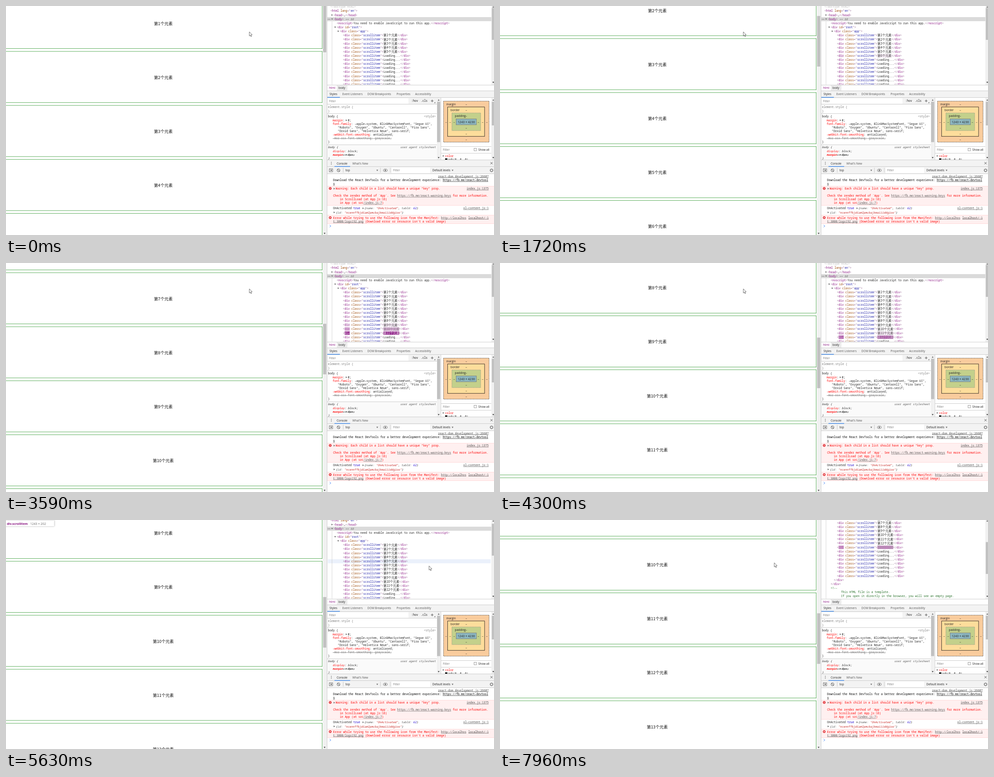
Write an HTML page with a canvas that moves like this. It is 1089 px wide and 514 px high and loops after 8 s.

```html
<!DOCTYPE html>
<html lang="zh">
<head>
<meta charset="utf-8">
<title>Lazy list</title>
<style>
html, body { margin: 0; width: 100%; height: 100%; overflow: hidden; background: #fff; }
canvas { display: block; }
</style>
</head>
<body>
<canvas id="stage" width="1089" height="514"></canvas>
<script>
const ctx = document.getElementById('stage').getContext('2d');
const LOOP = 8000, NOTCH = 57.15, PITCH = 121.15, ROW = 9.14, CH = 3.762;
const MONO = ['"Noto Sans Mono", monospace', 6.27];
const UI = ['"Open Sans", sans-serif', 6.4];
const CJK = ['"Noto Sans CJK SC", "Noto Sans CJK", sans-serif', 6.9];
const TAG = '#881280', BRACKET = '#8f5f8c', ATTR = '#994500', VALUE = '#1a1aa6';
const RED = '#f00', GREY = '#777', DARK = '#222', BAR = '#f3f3f3', EDGE = '#ccc';

// Motion
const NOTCHES = [130, 680, 1610, 1830, 2040, 2240, 2440, 2690, 2870, 3050, 3220, 3390,
  3750, 3950, 4200, 7520, 7640, 7770];
const LOADS = { 6: 850, 7: 1950, 8: 2340, 9: 2790, 10: 3180, 11: 3550, 12: 4140, 13: 7700 };
const MOUSE = [[0, 543, 58], [4500, 543, 58], [4900, 719, 31], [4940, 725, 46], [5310, 940, 103],
  [5480, 944, 103], [6180, 944, 103], [6450, 790, 101], [6870, 790, 101], [7260, 612, 96]];
const PAUSES = [[5480, 6180], [6450, 6870]];
const FLASH = 1400;

function ramp(t, start, dur) {
  const k = Math.min(1, Math.max(0, (t - start) / dur));
  return k * k * (3 - 2 * k);
}
const pageScroll = t => NOTCH * NOTCHES.reduce((sum, s) => sum + ramp(t, s, 190), 0);
const treeScroll = t => NOTCH * (3 * ramp(t, 5590, 280) - ramp(t, 6486, 160));

function mouseAt(t) {
  const i = MOUSE.findIndex(m => m[0] > t);
  if (i < 0) return MOUSE[MOUSE.length - 1].slice(1);
  const [a, b] = [MOUSE[Math.max(0, i - 1)], MOUSE[i]];
  const k = Math.max(0, (t - a[0]) / (b[0] - a[0]));
  return [a[1] + (b[1] - a[1]) * k, a[2] + (b[2] - a[2]) * k];
}

// The hovered row is only refreshed while the pointer moves.
function hoverRow(t) {
  const pause = PAUSES.find(p => t > p[0] && t < p[1]);
  const at = pause ? pause[0] : t;
  const [x, y] = mouseAt(at);
  if (x < 718 || y > 176) return -1;
  const row = Math.floor((y + 2.57 + treeScroll(at)) / ROW);
  return row >= 29 && row <= 38 ? 29 : row;
}

// Strength of the update flash: cubic-bezier(0, 0, .2, 1), fading out.
function flashOf(n, t) {
  const age = (t - LOADS[n]) / FLASH;
  if (!(age >= 0 && age < 1)) return 0;
  let lo = 0, hi = 1;
  for (let i = 0; i < 16; i++) {
    const s = (lo + hi) / 2;
    if (s * s * (0.6 + 0.4 * s) < age) lo = s; else hi = s;
  }
  return 1 - lo * lo * (3 - 2 * lo);
}

// Drawing helpers
function rect(x, y, w, h, color) {
  ctx.fillStyle = color;
  ctx.fillRect(x, y, w, h);
}
const hline = (x, y, w, color = EDGE) => rect(x, Math.round(y), w, 1, color);
const vline = (x, y, h, color = EDGE) => rect(Math.round(x), y, 1, h, color);

function frame(x, y, w, h, fill, stroke, dash = []) {
  rect(x, y, w, h, fill);
  ctx.strokeStyle = stroke;
  ctx.lineWidth = 0.8;
  ctx.setLineDash(dash);
  ctx.strokeRect(x, y, w, h);
  ctx.setLineDash([]);
}

function poly(points, fill, stroke, x = 0, y = 0, width = 0.8) {
  ctx.beginPath();
  points.forEach(([px, py]) => ctx.lineTo(x + px, y + py));
  ctx.closePath();
  if (fill) { ctx.fillStyle = fill; ctx.fill(); }
  if (stroke) { ctx.strokeStyle = stroke; ctx.lineWidth = width; ctx.stroke(); }
}

function circle(x, y, r, fill, stroke) {
  ctx.beginPath();
  ctx.arc(x, y, r, 0, 7);
  if (fill) { ctx.fillStyle = fill; ctx.fill(); }
  if (stroke) { ctx.strokeStyle = stroke; ctx.lineWidth = 0.9; ctx.stroke(); }
}

const right = (x, y, color = '#6e6e6e') => poly([[-1.4, -2], [1.8, 0], [-1.4, 2]], color, null, x, y);
const down = (x, y, color = '#6e6e6e') => poly([[-2, -1.4], [2, -1.4], [0, 1.8]], color, null, x, y);
const up = (x, y) => poly([[-2, 1.4], [2, 1.4], [0, -1.8]], '#6e6e6e', null, x, y);

// Text is set ten times larger and scaled down to keep fractional advances. y is the middle.
function put(s, x, y, color, font = UI, style = '', size = font[1]) {
  const slant = style.includes('i') ? 'italic ' : '';
  const weight = style.includes('b') ? 'bold ' : '';
  ctx.save();
  ctx.translate(x, y + size * 0.36);
  ctx.scale(0.1, 0.1);
  ctx.font = `${slant}${weight}${size * 10}px ${font[0]}`;
  ctx.fillStyle = color;
  const w = ctx.measureText(s).width / 10;
  if (style.includes('c')) ctx.translate(-w * 5, 0);
  ctx.fillText(s, 0, 0);
  ctx.restore();
  if (style.includes('u')) rect(x, y + 2.8, w, 0.6, color);
  if (style.includes('s')) rect(x, y + 0.2, w, 0.6, color);
  return w;
}

function code(x, y, ...parts) {
  for (const [s, color = DARK, style = ''] of parts) x += put(s, x, y, color, MONO, style);
  return x;
}
const codeRight = (s, x, y, color, style) => code(x - s.length * CH, y, [s, color, style]);

// Colours one line of HTML; flash marks the tag name and its text.
function markup(s, x, y, flash = 0) {
  let inTag = false, quoted = false, named = false, closing = false;
  for (const tok of s.match(/<\/?|[>="]|\s|[^<>="\s]+/g)) {
    let color = BRACKET, lit = false;
    if (tok[0] === '<') { inTag = true; named = false; closing = tok === '</'; }
    else if (tok === '>') inTag = false;
    else if (tok === '"') quoted = !quoted;
    else if (!inTag) { color = DARK; lit = true; }
    else if (quoted) color = VALUE;
    else if (!named) { color = TAG; named = true; lit = !closing; }
    else if (tok !== '=') color = ATTR;
    const font = /[\u4e00-\u9fff]/.test(tok) ? CJK : MONO;
    if (lit && flash) {
      const w = put(tok, x, y, 'transparent', font);
      ctx.globalAlpha = flash;
      rect(x, y - 3.8, w, 7.6, TAG);
      ctx.globalAlpha = 1 - flash;
      put(tok, x, y, color, font);
      ctx.globalAlpha = flash;
      x += put(tok, x, y, '#fff', font);
      ctx.globalAlpha = 1;
    } else x += put(tok, x, y, color, font);
  }
  return x;
}

function clipped(x, y, w, h, draw) {
  ctx.save();
  ctx.beginPath();
  ctx.rect(x, y, w, h);
  ctx.clip();
  draw();
  ctx.restore();
}

// Page
const itemTop = n => -19.55 + PITCH * (n - 1);

function tooltip(y, name, size) {
  ctx.save();
  ctx.shadowColor = 'rgba(0,0,0,.35)';
  ctx.shadowBlur = 3;
  const w = name.length * 3.9 + 53;
  rect(-2, y, w + 2, 13, '#fff');
  ctx.restore();
  const end = 2 + put(name, 2, y + 7.5, TAG, UI, 'b', 6.9);
  put(size, end + 5.5, y + 7.5, '#666', UI, '', 6.9);
}

function drawOverlay(t, scroll) {
  const row = hoverRow(t - 40), blue = 'rgba(111,168,220,.66)';
  const whole = { 3: 'body', 5: 'div#root', 6: 'div.app' }[row];
  if (whole) {
    rect(0, 0, 706.5, 514, blue);
    tooltip(501, whole, '1243 × 4230');
  } else if (row >= 7 && row <= 26) {
    const y = itemTop(row - 6) - scroll;
    rect(0, y, 706.5, 115.5, blue);
    tooltip(y > 514 ? 501 : Math.max(1, y - 14), 'div.scrollitem', '1243 × 202');
  }
}

function drawPage(t) {
  const scroll = pageScroll(t), green = '#008000', line = 0.65;
  clipped(0, 0, 707, 514, () => {
    for (let n = 1; n <= 20; n++) {
      const y = itemTop(n) - scroll;
      if (y > 514 || y < -120) continue;
      rect(0, y, 706, line, green);
      rect(0, y + 114.9, 706, line, green);
      rect(705.3, y, line, 115.5, green);
      put(`第${n}个元素`, 351, y + 58.8, '#111', CJK, 'c', 9.14);
    }
    drawOverlay(t, scroll);
  });
  rect(707, 0, 9, 514, '#f1f1f1');
  rect(707.5, 104 + 0.2128 * scroll - 113.5, 7.3, 113.5, '#c1c1c1');
  down(711, 510.5, '#505050');
  vline(715.5, 0, 514);
}

// Element tree
const COMMENT = ['<!--', 'This HTML file is a template.',
  'If you open it directly in the browser, you will see an empty page.', '',
  'You can add webfonts, meta tags, or analytics to this file.',
  'The build step will place the bundled scripts into the <body> tag.', '',
  'To begin the development, run `npm start` or `yarn start`.',
  'To create a production bundle, use `npm run build` or `yarn build`.', '-->'];

function drawTree(t) {
  const shift = treeScroll(t), yOf = r => 2 + ROW * r - shift;
  rect(717, 0, 372, 177, '#fff');
  clipped(717, 0, 366, 176.5, () => {
    const hover = hoverRow(t);
    rect(717, yOf(3) - 4.5, 366, ROW, '#dadada');
    if (hover >= 0 && hover !== 3) {
      const rows = hover === 29 ? 10 : 1;
      rect(718, yOf(hover) - 4.5, 363.5, ROW * rows, '#ebf1fb');
    }
    rect(727.2, yOf(3) + 5, 0.8, 330, '#ccc');
    code(724, yOf(0), ['<!doctype html>', '#c0c0c0']);
    markup('<html lang="en">', 724, yOf(1));
    right(727.7, yOf(2));
    markup('<head>…</head>', 731, yOf(2));
    for (let i = 0; i < 3; i++) circle(718.6 + 2.3 * i, yOf(3) + 0.3, 0.8, '#666');
    down(727.7, yOf(3));
    code(markup('<body>', 731, yOf(3)), yOf(3), [' == $0', GREY, 'i']);
    markup('<noscript>You need to enable JavaScript to run this app.</noscript>', 738, yOf(4));
    down(734.5, yOf(5));
    markup('<div id="root">', 738, yOf(5));
    down(741.3, yOf(6));
    markup('<div class="app">', 745, yOf(6));
    for (let n = 1; n <= 20; n++) {
      const ready = n <= 5 || t >= LOADS[n];
      const label = ready ? `第${n}个元素` : 'Loading...';
      markup(`<div class="scrollitem">${label}</div>`, 752, yOf(n + 6), flashOf(n, t));
    }
    markup('</div>', 745, yOf(27));
    markup('</div>', 738, yOf(28));
    COMMENT.forEach((s, i) => code(i % 9 ? 761 : 738, yOf(29 + i), [s, '#236e25']));
    markup('</body>', 731, yOf(39));
    markup('</html>', 724, yOf(40));
  });
  rect(1083, 0, 6, 177, '#f1f1f1');
  rect(1084, 76 + 0.394 * shift - 71.5, 5, 71.5, '#c1c1c1');
  up(1087.3, 2);
  down(1087.3, 171.5, '#505050');
}

function drawStyles() {
  rect(717, 177, 372, 169, '#fff');
  hline(717, 176.5, 372);
  put('html', 721, 184, TAG);
  rect(738, 178, 24, 12, '#ececec');
  put('body', 742, 184, DARK);
  rect(717, 190, 372, 16, BAR);
  hline(717, 190, 372);
  [['Styles', 722], ['Event Listeners', 750.5], ['DOM Breakpoints', 806.5], ['Properties', 871.5],
    ['Accessibility', 913]].forEach(([s, x], i) => put(s, x, 198, i ? '#555' : DARK));
  hline(717, 205, 372);
  rect(717, 204.4, 28, 1.2, '#1a73e8');

  rect(717, 206, 246, 14, BAR);
  rect(718, 207, 180, 12.5, '#fff');
  put('Filter', 721, 213.5, GREY);
  code(904.5, 213, [':hov', '#111']);
  code(925.5, 213, ['.cls', '#111']);
  rect(948, 212.6, 6, 0.9, '#444');
  rect(950.6, 210, 0.9, 6, '#444');
  poly([[958, 215.5], [958, 218], [955.5, 218]], '#555');
  hline(717, 219.5, 246);

  code(718.5, 226.5, ['element.style {', GREY]);
  code(718.5, 235.5, ['}', GREY]);
  hline(717, 241.4, 246);
  code(718.5, 247.5, ['body {']);
  codeRight('<style>', 959, 247.5, GREY);
  code(729, 256.5, ['margin', RED], [':  0;']);
  right(759.5, 256.5);
  code(729, 265, ['font-family', RED], [': -apple-system, BlinkMacSystemFont, "Segoe UI",']);
  code(740.5, 273, ['"Roboto", "Oxygen", "Ubuntu", "Cantarell", "Fira Sans",']);
  code(740.5, 281, ['"Droid Sans", "Helvetica Neue", sans-serif;']);
  code(729, 289, ['-webkit-font-smoothing', RED], [': antialiased;']);
  code(729, 297, ['-moz-osx-font-smoothing: grayscale;', GREY, 's']);
  code(718.5, 305, ['}']);
  clipped(717, 311, 246, 34.5, () => {
    rect(717, 311, 246, 35, '#fafafa');
    hline(717, 311, 246);
    code(718.5, 316.5, ['body {', DARK, 'i']);
    codeRight('user agent stylesheet', 959, 316.5, '#555', 'i');
    code(729, 325.5, ['display', RED, 'i'], [': block;', DARK, 'i']);
    code(729, 334, ['margin', RED, 'is'], [':  8px;', DARK, 'is']);
    right(759.5, 334);
    code(718.5, 342, ['}', DARK, 'i']);
  });
  rect(961.5, 206, 8, 140, '#f1f1f1');
  rect(962, 215, 7, 90.5, '#c1c1c1');
  up(965.5, 211);
  down(965.5, 340.5, '#505050');
  vline(970, 206, 140);
}

function drawBoxModel() {
  frame(976.3, 213.5, 101.7, 92, '#f9cc9d', '#222', [2, 1.4]);
  frame(985.5, 226.7, 82.5, 66, '#fddd9b', '#111');
  frame(995, 240, 64.2, 39.7, '#c3d08b', '#888', [2, 1.4]);
  frame(1004.5, 253.5, 45.3, 13.2, '#8cb6c0', '#777');
  put('margin', 982.5, 221, DARK);
  put('border', 992, 234, DARK);
  put('padding', 1001.5, 247, DARK);
  put('1243 × 4230', 1027.2, 260.3, DARK, UI, 'c', 6.8);
  [221, 234, 247, 273.5, 286.5, 300].forEach(y => put('–', 1027, y, DARK, UI, 'c'));
  [982, 991, 1000, 1054, 1063.5, 1073].forEach(x => put('–', x, 260.5, DARK, UI, 'c'));
  hline(971, 314.5, 112);
  put('Filter', 975, 323, GREY);
  frame(1044.5, 319.5, 5.5, 5.5, '#fff', '#888');
  put('Show all', 1054, 323, DARK);
  hline(971, 330, 112);
  clipped(971, 331, 112, 14.5, () => {
    right(976, 336.5);
    code(980, 336.5, ['color', RED]);
    rect(980, 342, 5, 5, '#000');
    code(986.5, 344.8, ['rgb(0, 0, 0)']);
  });
  rect(1083, 206, 6, 140, '#f1f1f1');
  rect(1084, 215, 5, 53, '#c1c1c1');
  up(1087.3, 211);
  down(1087.3, 340.5, '#505050');
}

// Console
function drawConsoleBars() {
  rect(717, 345.5, 372, 31, BAR);
  hline(717, 345, 372);
  [350.5, 353, 355.5].forEach(y => circle(726, y, 0.7, '#444'));
  put('Console', 738, 353.3, DARK);
  put("What's New", 773, 353.3, '#555');
  ctx.strokeStyle = '#444';
  ctx.lineWidth = 0.9;
  ctx.beginPath();
  ctx.moveTo(1081, 350.3); ctx.lineTo(1086, 355.3);
  ctx.moveTo(1086, 350.3); ctx.lineTo(1081, 355.3);
  ctx.stroke();
  hline(717, 360, 372);
  rect(733, 359.6, 35, 1.2, '#1a73e8');
  frame(721.5, 365.5, 7.5, 6.5, BAR, '#555');
  right(726, 368.8, '#444');
  circle(742, 368.8, 3.3, null, '#555');
  poly([[739.7, 366.5], [744.3, 371.1]], null, '#555');
  [752, 835, 857].forEach(x => vline(x, 363, 11));
  put('top', 757.5, 368.8, DARK);
  down(828.5, 369);
  ctx.beginPath();
  ctx.ellipse(846.5, 368.8, 4.4, 2.8, 0, 0, 7);
  ctx.strokeStyle = '#555';
  ctx.stroke();
  circle(846.5, 368.8, 1.4, '#444');
  rect(861, 362.5, 85.5, 12.5, '#fff');
  put('Filter', 864, 369, GREY);
  put('Default levels', 951.5, 368.8, DARK);
  down(996.5, 369);
  circle(1083.5, 368.8, 2.6, null, '#555');
  for (let i = 0; i < 8; i++) {
    const a = i * Math.PI / 4;
    circle(1083.5 + 3.4 * Math.cos(a), 368.8 + 3.4 * Math.sin(a), 0.7, '#555');
  }
  hline(717, 376, 372);
}

function errorIcon(y) {
  circle(723.5, y, 3, '#e0282e');
  poly([[722.3, y - 1.2], [724.7, y + 1.2]], null, '#fff');
  poly([[724.7, y - 1.2], [722.3, y + 1.2]], null, '#fff');
}

function drawMessages() {
  const link = '#555';
  rect(717, 377, 372, 137, '#fff');
  codeRight('react-dom.development.js:26607', 1077, 382.5, '#444', 'u');
  code(730, 391, ['Download the React DevTools for a better development experience: ', '#000'],
    ['https://fb.me/react-devtool', '#000', 'u']);
  code(730, 399, ['s', '#000', 'u']);

  [[404, 43], [469, 19]].forEach(([y, h]) => {
    rect(717, y, 372, h, '#fff0f0');
    hline(717, y, 372, '#ffd9d9');
    hline(717, y + h, 372, '#ffd9d9');
  });
  errorIcon(409.5);
  right(732.5, 410);
  code(735.5, 410, ['Warning: Each child in a list should have a unique "key" prop.', RED]);
  codeRight('index.js:1375', 1077, 410, '#444', 'u');
  code(730, 426, ['Check the render method of `App`. See ', RED],
    ['https://fb.me/react-warning-keys', link, 'u'], [' for more information.', RED]);
  code(730, 434, ['    in ScrollLoad (at App.js:16)', RED]);
  code(730, 442, ['    in App (at src', RED], ['/index.js:7', link, 'u'], [')', RED]);

  code(730, 454, ['OnActivated '], ['true', '#1c00cf']);
  right(797, 454);
  code(799.5, 454, ['{', DARK, 'i'], ['name: ', '#565656', 'i'], ['"OnActivated"', '#c41a16', 'i'],
    [', ', DARK, 'i'], ['tabId: ', '#565656', 'i'], ['62', '#1c00cf', 'i'], ['}', DARK, 'i']);
  codeRight('xl-content.js:1', 1077, 454, '#444', 'u');
  right(732.5, 463.3);
  code(736, 463.3, ['{', DARK, 'i'], ['id: ', '#565656', 'i'],
    ['"ncennffkjdiamlpmcbajkmaiiiddgioo"', '#c41a16', 'i'], ['}', DARK, 'i']);

  errorIcon(475);
  code(730, 475.3, ['Error while trying to use the following icon from the Manifest: ', RED],
    ['http://localhos', link, 'u']);
  codeRight('localhost/:1', 1077, 475.3, '#444', 'u');
  code(730, 483.3, ['t:3000/logo192.png', link, 'u'],
    [" (Download error or resource isn't a valid image)", RED]);
  ctx.strokeStyle = '#367cf1';
  ctx.lineWidth = 1;
  ctx.beginPath();
  ctx.moveTo(722.3, 491.5); ctx.lineTo(724.8, 494); ctx.lineTo(722.3, 496.5);
  ctx.stroke();
}

const ARROW = [[0, 0], [0, 9.3], [2.1, 7.4], [3.6, 10.7], [5, 10.1], [3.6, 6.9], [6.4, 6.6]];
const HAND = [[-1, 0.2], [0, -0.5], [1, 0.2], [1, 4.4], [2.6, 4.2], [4.2, 5], [5.6, 5.4],
  [6, 7], [5, 10.5], [4.6, 13], [-0.8, 13], [-1.6, 10.6], [-4, 7.4], [-3, 6.6], [-1, 8.4]];

function drawCursor(t) {
  const [x, y] = mouseAt(t);
  poly(x > 717 && x < 735 ? HAND : ARROW, '#fff', '#222', x, y, 0.65);
}

function draw(t) {
  rect(0, 0, 1089, 514, '#fff');
  drawPage(t);
  drawTree(t);
  drawStyles();
  drawBoxModel();
  drawConsoleBars();
  drawMessages();
  drawCursor(t);
}

const begin = performance.now();
function tick() {
  draw((performance.now() - begin) % LOOP);
  requestAnimationFrame(tick);
}
tick();
</script>
</body>
</html>
```
